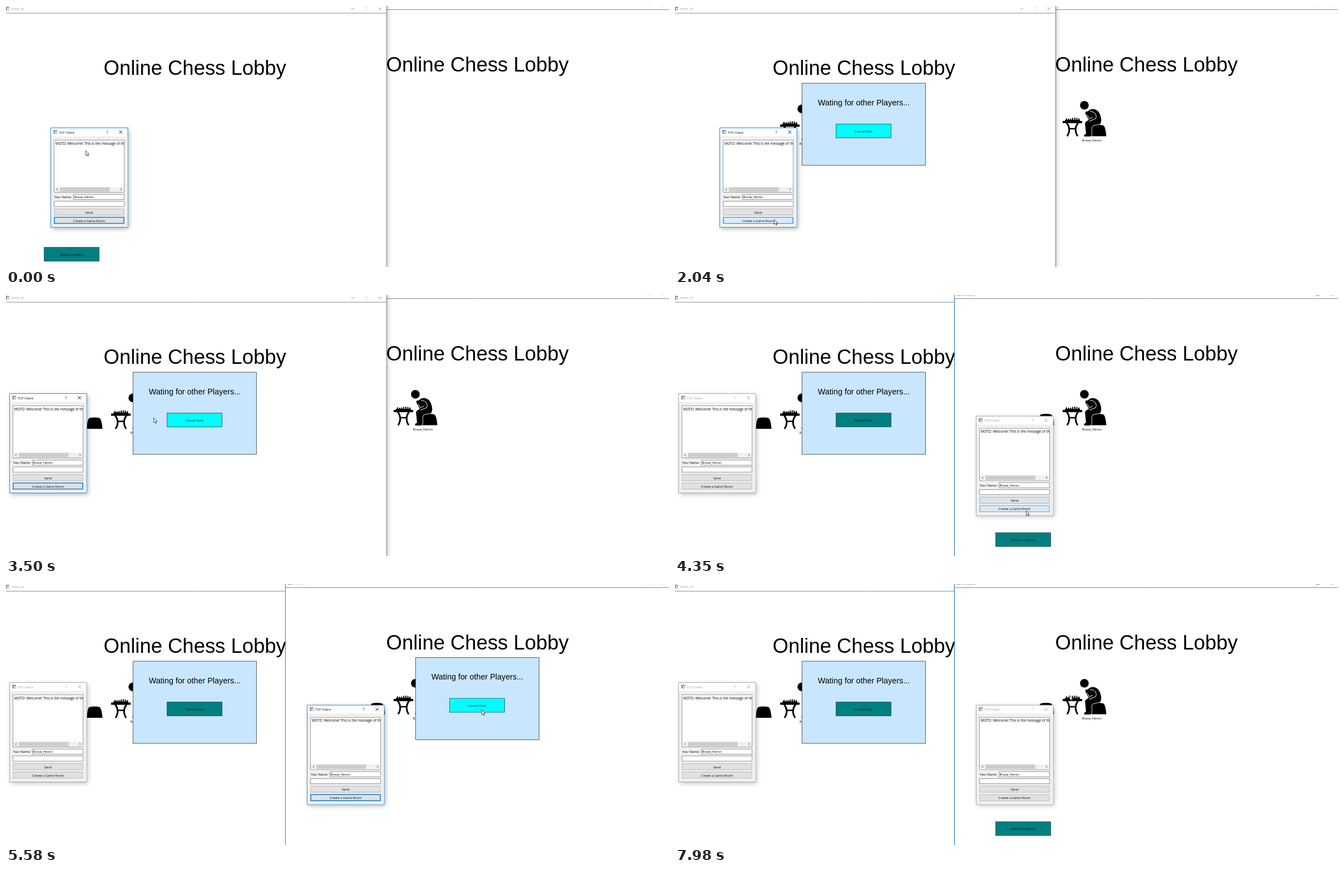
Write an HTML page with a canvas that moves like this. It is 1192x470 px and loops after 8000 ms.

```html
<!DOCTYPE html>
<html lang="en">
<head>
<meta charset="utf-8">
<title>Online Chess Lobby</title>
<style>
html, body { margin: 0; width: 100%; height: 100%; overflow: hidden; background: #fff; }
canvas { display: block; }
</style>
</head>
<body>
<canvas id="stage" width="1192" height="470"></canvas>
<script>
const ctx = document.getElementById('stage').getContext('2d');
const LOOP = 8000;
const TICK = 70;                // pointer moves advance once per tick
const UI = '"Open Sans", "Noto Sans", sans-serif';
const ARIAL = '"Liberation Sans", Arial, sans-serif';
const PLAYER = 'Brave_Heron';
const SECOND = [508, -6.5];     // second window relative to the first
const GRAB = [59, 9];           // where the dialog is held while dragged

const HOSTED = 2040, DRAG = 3140, DROP = 3430, CANCEL_LEFT = 3580,
  SWITCH = 3860, HOSTED_2 = 4660, CANCELLED_2 = 6600;

// Pointer glides: start, end, x, y and how far the path bows sideways
const GLIDES = [
  [70, 160, 145, 273],
  [330, 550, 177, 320],
  [700, 1490, 188, 374, 1.2],
  [1580, 1810, 178, 384],
  [2110, 2830, 152, 229],
  [2880, 2960, 139, 228],
  [DRAG, 3290, 74, 199],
  [DROP, DROP, 65, 186],
  [3500, SWITCH, 720, 300],
  [3930, 4210, 632, 370],
  [4280, 4350, 631, 388],
  [4970, 5300, 905, 228, .25],
  [5370, 5510, 855, 226],
  [5650, 5650, 863, 210],
  [5890, 5960, 864, 211],
  [6750, 6960, 919, 270],
  [7030, 7520, 453, 255, -.14],
  [7600, 7670, 402, 268],
  [7740, 7980, 709, 200]
];

function pointerAt(t) {
  let x = 143, y = 260;
  for (const [start, end, toX, toY, bow = 0] of GLIDES) {
    if (t < start) break;
    const ticks = Math.round((end - start) / TICK) + 1;
    const p = Math.min(1, (Math.floor((t - start) / TICK) + 1) / ticks);
    const eased = p * (2 - p);
    const side = p < 1 ? bow * Math.sin(Math.PI * eased) : 0;
    const dx = toX - x, dy = toY - y;
    x += dx * eased - dy * -side * Math.sign(bow || 1) * Math.sign(bow || 1);
    y += dy * eased + dx * side * (dx > 0 || bow < 0 ? 1 : -1);
  }
  return [x, y];
}

const between = (t, a, b) => t >= a && t < b;

function at(x, y, draw) {
  ctx.save();
  ctx.translate(x, y);
  draw();
  ctx.restore();
}

function box(x, y, w, h, fill, stroke, width = 1) {
  if (fill) { ctx.fillStyle = fill; ctx.fillRect(x, y, w, h); }
  if (stroke) { ctx.strokeStyle = stroke; ctx.lineWidth = width; ctx.strokeRect(x, y, w, h); }
}

function shadowBox(x, y, w, h, blur, strength, stroke) {
  ctx.save();
  ctx.shadowColor = `rgba(0,0,0,${strength})`;
  ctx.shadowBlur = blur;
  ctx.shadowOffsetX = ctx.shadowOffsetY = 2;
  box(x, y, w, h, '#fff');
  ctx.restore();
  box(x, y, w, h, null, stroke);
}

function text(string, x, y, size, { color = '#000', align = 'left', font = UI } = {}) {
  ctx.font = `${size}px ${font}`;
  ctx.fillStyle = color;
  ctx.textAlign = align;
  ctx.fillText(string, x, y);
}

function line(path, color, width = 1) {
  ctx.strokeStyle = color;
  ctx.lineWidth = width;
  ctx.stroke(new Path2D(path));
}

function shape(path, color = '#000') {
  ctx.fillStyle = color;
  ctx.fill(new Path2D(path));
}

function appIcon(x, y) {
  box(x, y, 6, 5.5, '#fff', '#777', .7);
  box(x, y, 6, 1.5, '#777');
  box(x + 1, y + 2.3, 2, 2.4, '#5a6b7c');
}

// Game table with a thinking player and a stool on each side
function room() {
  const stool = 'M24 215Q33 213 42 215Q46 217 47.5 234.5H19.5Q20 217 24 215Z';
  const body = 'M14 190C21 182 32 185 36 195C39 203 39 209 36 213L28 214Q21 215 21 220' +
    'V231Q21 235 17 235H8Q6 232 11 230L9.5 215Q8 209 13 207L16 205L10 194Q9 189 14 190Z';
  at(220, 6.5, () => {
    at(-94, 0, () => shape(stool));
    shape(stool);

    shape('M-31 207H4V211H-31ZM-27 205H0V207H-27Z');
    for (let x = -25; x < 0; x += 3.7) box(x, 202 + Math.sin(x * 2), 2, 4, '#000');
    line('M-24 210Q-15 222-23 234.5M-3 210Q-12 222-4 234.5', '#000', 3);
    line('M-20 221H-7', '#000', 2.5);

    ctx.beginPath();
    ctx.arc(8, 178.7, 7.8, 0, 7);
    ctx.fill();
    line(body, '#fff', 1.6);
    shape(body);
    line('M18 190C26 189 32 197 28 203L17 207.5M13 196L17 203L23 200', '#fff');
  });
  text(PLAYER, 223.7, 250, 5.9);
}

function flatButton(label, x, y, color) {
  box(x, y, 99, 25, color, '#234', .7);
  text(label, x + 49.5, y + 15, 5.75, { align: 'center' });
}

function popup(cancelColor) {
  box(228.3, 139, 222, 148, '#c8e6fd', '#333', .8);
  text('Wating for other Players...', 256.8, 178.5, 14.35, { font: ARIAL });
  flatButton('Cancel Host', 289.5, 212.5, cancelColor);
}

function lobby({ active, hosted, menu, cancelColor, showRoom }) {
  shadowBox(-5.5, -8, 690, 500, 8, .2, active ? '#1874b8' : '#777');
  const ink = active ? '#222' : '#999';
  appIcon(-1, 2);
  text('chess_AI', 8.5, 7.4, 6, { color: ink });
  line('M620.5 5H626', ink, .9);
  box(645, 2.5, 5, 5, null, active ? '#555' : '#ddd', .7);
  line('M669.5 2.5L674.5 7.5M674.5 2.5L669.5 7.5', ink, .8);
  line('M-5 13H684', '#888');

  text('Online Chess Lobby', 175.6, 124, 36.45, { font: ARIAL });
  if (showRoom) room();
  if (hosted) popup(cancelColor);
  if (menu) flatButton('Return to Menu', 68.5, 434.5, '#008080');
}

// Buttons fade in and out, so recent pointer places count too
function hover(t, [left, top], buttonTop) {
  const hits = [0, 1, 2].filter(age => {
    const [x, y] = pointerAt(t - age * TICK);
    return between(x - left, 7, 132) && between(y - top, buttonTop, buttonTop + 12);
  });
  return hits.length / 3;
}

function dialogButton(label, top, glow, focused) {
  box(7, top, 125, 11, '#e1e1e1', '#adadad', .8);
  if (glow) {
    ctx.globalAlpha = glow;
    box(7, top, 125, 11, '#d9ebfa', '#4a98d8', .9);
    ctx.globalAlpha = 1;
  }
  if (focused) box(7, top, 125, 11, null, '#1883d7', glow > .5 ? .8 : 1.6);
  text(label, 69.5, top + 8.2, 5.8, { align: 'center' });
}

function dialog(t, place, active) {
  at(...place, () => {
    shadowBox(.5, .5, 138.5, 179, 8, active ? .32 : .25, active ? '#3c8fd0' : '#aaa');
    box(1, 15.5, 137.5, 163.5, '#f0f0f0');
    const ink = active ? '#000' : '#999';
    appIcon(5.5, 5);
    text('TCP Client', 15, 10.7, 6, { color: ink });
    text('?', 102, 10.5, 7, { color: ink, align: 'center' });
    line('M123.5 5.3L129 10.8M129 5.3L123.5 10.8', ink, .9);

    box(6.5, 22.5, 126, 94, '#fff', '#828790', .8);
    ctx.save();
    ctx.beginPath();
    ctx.rect(7, 23, 125.3, 93);
    ctx.clip();
    text('MOTD: Welcome! This is the message of the day', 8.8, 30.5, 6.25);
    ctx.restore();
    box(7, 107, 125, 9, '#f0f0f0');
    box(17, 107.3, 89.5, 8, '#cdcdcd');
    line('M13 109L11 111.2L13 113.4M126 109L128 111.2L126 113.4', '#444', .9);

    text('Your Name:', 6.7, 127, 5.75);
    box(41.5, 120.2, 91, 9.3, '#fff', '#7a7a7a', .8);
    text(PLAYER, 42.5, 127, 5.9);
    box(6.5, 132.7, 126, 9.3, '#fff', '#7a7a7a', .8);
    dialogButton('Send', 146.3, hover(t, place, 146), false);
    dialogButton('Create a Game Room', 161.5, hover(t, place, 161), active);
  });
}

function pointer([x, y]) {
  at(x + .5, y + .5, () => {
    const arrow = 'M0 0V8.6L2 6.8L3.5 10L4.9 9.4L3.5 6.3H6Z';
    shape(arrow, '#fff');
    line(arrow, '#222', .8);
  });
}

function draw(t) {
  const hosted = t >= HOSTED;
  const switched = t >= SWITCH;
  const hosted2 = between(t, HOSTED_2, CANCELLED_2);
  const held = pointerAt(Math.min(t, DROP));
  const place = t < DRAG ? [80, 219] : held.map((v, axis) => v - GRAB[axis]);

  const first = () => {
    lobby({
      active: false, hosted, showRoom: hosted, menu: !hosted,
      cancelColor: t < CANCEL_LEFT ? '#00ffff' : '#008080'
    });
    dialog(t, place, !switched);
  };
  const second = () => {
    at(...SECOND, () => lobby({
      active: switched && !hosted2, hosted: hosted2, showRoom: hosted,
      menu: switched && !hosted2, cancelColor: '#00ffff'
    }));
    if (switched) dialog(t, [541, 217.7], hosted2);
  };

  box(0, 0, 1192, 470, '#fff');
  const layers = switched ? [first, second] : [second, first];
  layers.forEach(paint => paint());
  pointer(pointerAt(t));
}

function frame() {
  draw(performance.now() % LOOP);
  requestAnimationFrame(frame);
}
frame();
</script>
</body>
</html>
```
